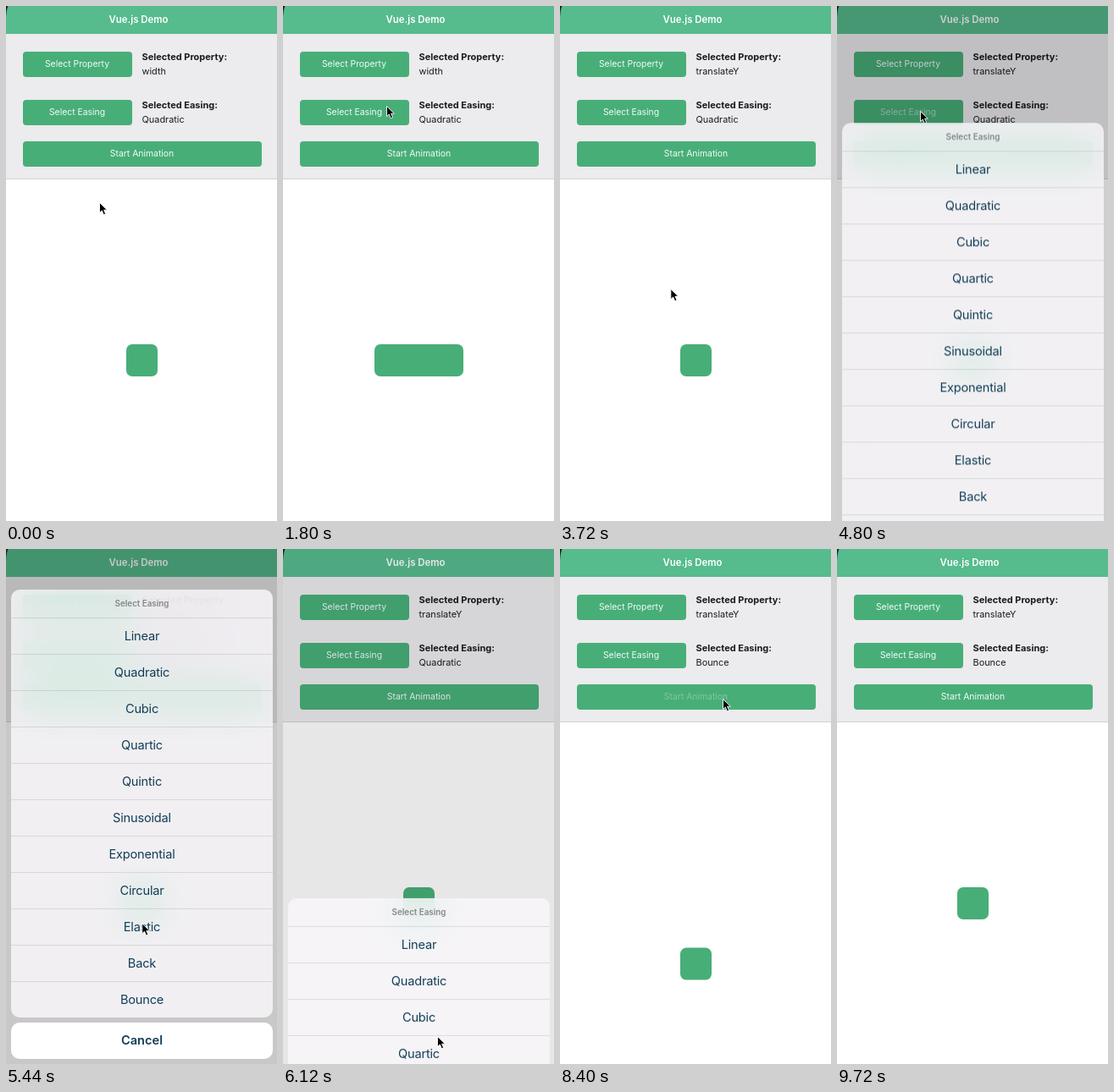
Animation, 320 px wide and 609 px high, one loop 9.8 s. Source, as an HTML page:

```html
<!DOCTYPE html>
<html lang="en">
<head>
<meta charset="utf-8">
<title>Vue.js Demo</title>
<style>
html, body { margin: 0; width: 100%; height: 100%; overflow: hidden; background: #fff; }
#stage { position: relative; width: 320px; height: 609px; overflow: hidden; background: #fff;
  font-family: Inter, Roboto, sans-serif; color: #1c1c1e; }
#stage div, #stage svg { position: absolute; box-sizing: border-box; white-space: nowrap; }
#head { left: 0; top: 0; width: 320px; height: 32.5px; line-height: 32px; padding-right: 7px; background: #56bb8d;
  color: #fff; font-size: 11.4px; font-weight: 600; text-align: center; }
#panel { left: 0; top: 32px; width: 320px; height: 173px; background: #ecebed; border-bottom: 1px solid #d2d1d5; }
.btn { left: 19.5px; width: 129px; height: 30px; line-height: 30px; border-radius: 4px; background: #48ae78;
  color: #f2fbf6; font-size: 10.4px; text-align: center; }
.btn span { display: block; }
.label, .value { left: 160.5px; height: 16px; line-height: 16px; }
.label { font-size: 11px; font-weight: 700; }
.value { font-size: 10.9px; }
#box { top: 400px; height: 37.5px; border-radius: 7px; background: #48ae78; }
#dim { left: 0; top: 0; width: 320px; height: 609px; background: #000; }
.sheet { left: 6px; top: 0; width: 309px; height: 609px; text-align: center; color: #123d57; }
.list { left: 0; top: 0; width: 309px; border-radius: 10px; overflow: hidden; background: rgba(248, 246, 249, .85);
  -webkit-backdrop-filter: blur(20px) saturate(2.2); backdrop-filter: blur(20px) saturate(2.2); }
.list .name { left: 0; top: 0; width: 100%; height: 33px; line-height: 33px;
  font-size: 9.8px; font-weight: 600; color: #858589; }
.list .row { left: 0; width: 100%; height: 43px; line-height: 42px; border-top: 1px solid rgba(60, 60, 67, .14);
  font-size: 14.6px; letter-spacing: -.2px; }
.cancel { left: 0; width: 309px; height: 43px; line-height: 42px; border-radius: 10px; background: #fff;
  font-size: 14.6px; font-weight: 600; }
#cursor { left: -.5px; top: -.5px; overflow: visible; }
</style>
</head>
<body>
<div id="stage">
  <div id="panel"></div>
  <div id="head">Vue.js Demo</div>
  <div class="btn" style="top:53.5px"><span id="propText">Select Property</span></div>
  <div class="btn" style="top:110.5px"><span id="easeText">Select Easing</span></div>
  <div class="btn" style="top:160px;width:282px"><span id="startText">Start Animation</span></div>
  <div class="label" style="top:52px">Selected Property:</div>
  <div class="value" style="top:68.5px" id="prop"></div>
  <div class="label" style="top:109px">Selected Easing:</div>
  <div class="value" style="top:125.5px" id="ease"></div>
  <div id="box"></div>
  <div id="dim"></div>
  <svg width="4" height="15" style="left:0;top:0"><path d="M0 0H2.4Q.4 5 0 14Z" fill="#15241c"/></svg>
  <svg id="cursor" width="12" height="18"><path d="M.5 .5V12.6L3.3 10L5.3 14.8L7.6 13.8L5.6 9.2H9.4Z"
    fill="#000" stroke="#fff" stroke-width=".9" stroke-linejoin="round"/></svg>
</div>
<script>
const LOOP = 9800, STAGE_H = 609, UNIT = 75, TWEEN = 750;
const $ = id => document.getElementById(id);
const clamp = v => Math.max(0, Math.min(1, v));
const mix = (a, b, p) => a + (b - a) * p;
const smooth = p => p * p * (3 - 2 * p);
const outQuart = p => 1 - (1 - p) ** 4;
const quadInOut = p => p < .5 ? 2 * p * p : 1 - 2 * (1 - p) ** 2;

function bounceOut(p) {
  const k = 7.5625, d = 2.75;
  if (p < 1 / d) return k * p * p;
  if (p < 2 / d) return k * (p - 1.5 / d) ** 2 + .75;
  if (p < 2.5 / d) return k * (p - 2.25 / d) ** 2 + .9375;
  return k * (p - 2.625 / d) ** 2 + .984375;
}
const bounceInOut = p => p < .5 ? (1 - bounceOut(1 - 2 * p)) / 2 : (1 + bounceOut(2 * p - 1)) / 2;

// Forward, then back with the same easing
function yoyo(t, start, easing) {
  const p = (t - start) / TWEEN;
  return p < 1 ? easing(clamp(p)) : 1 - easing(clamp(p - 1));
}

function add(parent, cls, text, top) {
  const el = document.createElement('div');
  el.className = cls;
  el.textContent = text;
  el.style.top = top + 'px';
  parent.appendChild(el);
  return el;
}

function makeSheet(title, items, open, close) {
  const el = add($('stage'), 'sheet', '', 0);
  $('stage').insertBefore(el, $('cursor'));
  const list = add(el, 'list', '', 0), height = 33 + 43 * items.length;
  list.style.height = height + 'px';
  add(list, 'name', title, 0);
  items.forEach((item, i) => add(list, 'row', item, 33 + 43 * i));
  add(el, 'cancel', 'Cancel', height + 6);
  return { el, total: height + 55, open, close };
}

const sheets = [
  makeSheet('Select Propety',
    ['width', 'height', 'rotate', 'scaleX', 'scaleY', 'translateX', 'translateY', 'opacity'], 2501, 3250),
  makeSheet('Select Easing',
    ['Linear', 'Quadratic', 'Cubic', 'Quartic', 'Quintic', 'Sinusoidal', 'Exponential', 'Circular',
      'Elastic', 'Back', 'Bounce'], 4636, 6017)
];

// Time, x, y of the pointer tip
const path = [
  [0, 110, 232], [120, 110, 232], [480, 152, 172], [1150, 152, 172], [1800, 122, 118], [2200, 96, 68],
  [2430, 96, 68], [2720, 137, 334], [3050, 148, 449], [3300, 148, 449], [4350, 98, 124], [4850, 98, 124],
  [5700, 178, 533], [5960, 178, 535], [6120, 182, 576], [6300, 182, 576], [7150, 192, 177],
  [8800, 192, 177], [9500, 280, 189]
];

function pointer(t) {
  const i = path.findIndex(k => k[0] > t);
  if (i < 0) return path[path.length - 1].slice(1);
  const [a, b] = [path[i - 1], path[i]], p = smooth((t - a[0]) / (b[0] - a[0]));
  return [mix(a[1], b[1], p), mix(a[2], b[2], p)];
}

// Button text dims while held and fades back after release
const presses = { propText: [[2300, 2450]], easeText: [[4480, 4720]], startText: [[520, 610], [7290, 7400], [8330, 8440]] };
const held = (t, [down, up]) => t < down ? 0 : 1 - clamp((t - up) / 250);

function draw(t) {
  const w = UNIT * (.5 + 2.5 * yoyo(t, 617, quadInOut));
  const y = UNIT * yoyo(t, 7406, bounceInOut);
  const box = $('box').style;
  box.width = w + 'px';
  box.left = 160.5 - w / 2 + 'px';
  box.transform = `translateY(${y}px)`;

  let dim = 0;
  for (const s of sheets) {
    const shown = outQuart(clamp((t - s.open) / 450)) - outQuart(clamp((t - s.close) / 450));
    s.el.style.display = shown > .001 ? '' : 'none';
    s.el.style.transform = `translateY(${STAGE_H - s.total * shown}px)`;
    dim = Math.max(dim, .215 * shown ** .8);
  }
  $('dim').style.opacity = dim;

  for (const id in presses)
    $(id).style.opacity = 1 - .68 * Math.max(...presses[id].map(p => held(t, p)));

  $('prop').textContent = t < 3680 ? 'width' : 'translateY';
  $('ease').textContent = t < 6450 ? 'Quadratic' : 'Bounce';

  const [px, py] = pointer(t);
  $('cursor').style.transform = `translate(${px}px, ${py}px)`;
  $('cursor').style.visibility = t < 9600 ? 'visible' : 'hidden';
}

const begin = performance.now();
function tick() {
  draw((performance.now() - begin) % LOOP);
  requestAnimationFrame(tick);
}
tick();
</script>
</body>
</html>
```
